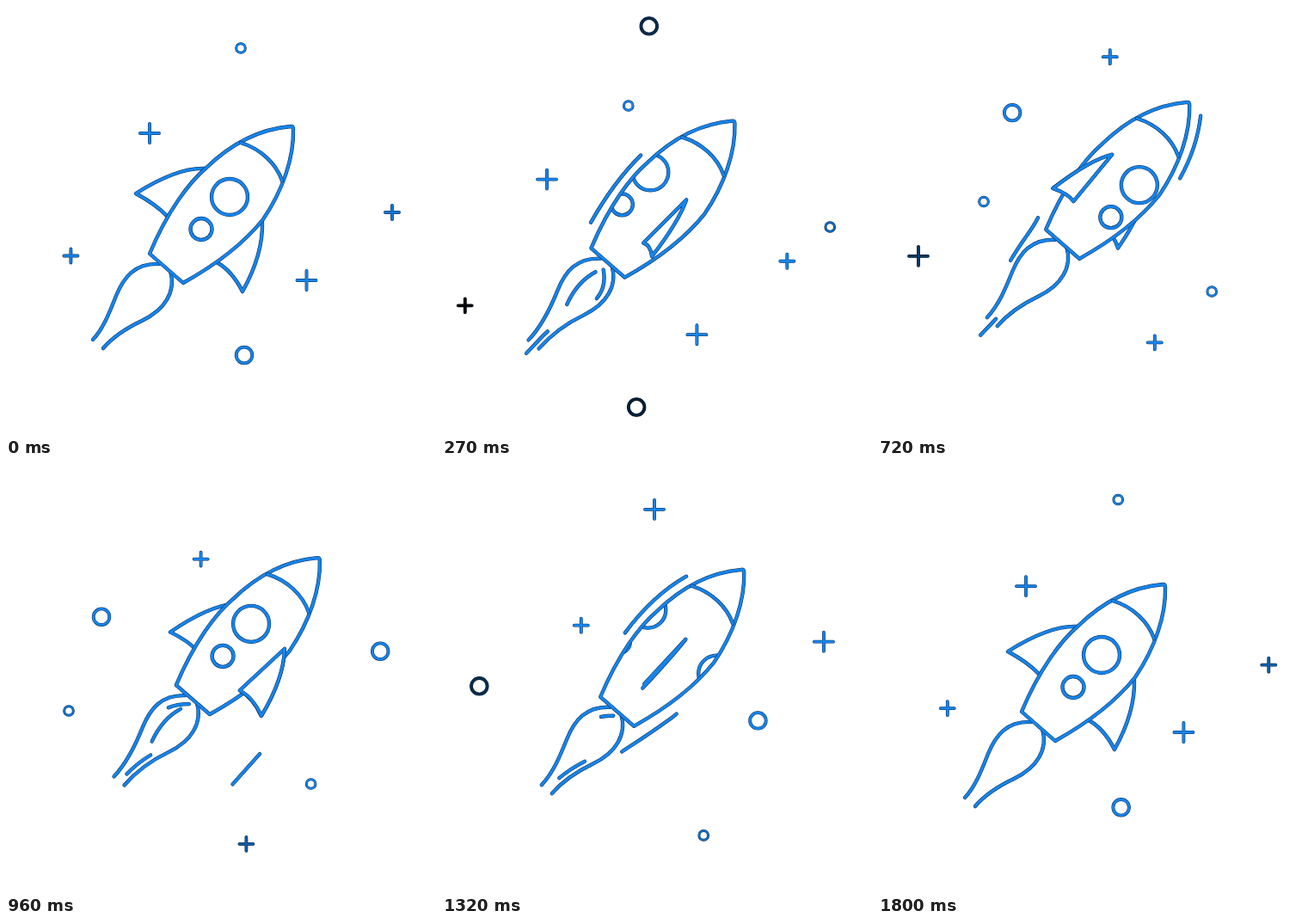
Recreate the animation shown at these times as an HTML page with a canvas. Size 500 by 500 pixels, loop 1.83 s.

```html
<!DOCTYPE html>
<html lang="en">
<head>
<meta charset="utf-8">
<title>Rocket</title>
<style>
html, body { margin: 0; width: 100%; height: 100%; overflow: hidden; background: #fff; }
canvas { display: block; width: 500px; height: 500px; }
</style>
</head>
<body>
<canvas id="stage"></canvas>
<script>
const LOOP = 1830, STEP = 30;
const CYCLE = 1800;   // one rise and fall; the loop ends with a short rest
const TURN = 895;     // half a roll about the long axis
const BLUE = [22, 132, 235], EDGE = [8, 44, 84];
const canvas = document.getElementById('stage');
const ctx = canvas.getContext('2d');
const scale = window.devicePixelRatio || 1;
canvas.width = canvas.height = 500 * scale;

// Rocket parts, in the resting position
const hull = new Path2D('M167 288C188 238 213 205 233 188C262 160 296 143 331 140Q334 140 334 143C335 176 322 214 299 248C275 278 242 302 206 322Z');
const nose = new Path2D('M273 159C296 166 314 183 321 203');
const finRight = [298, 250, 299, 277, 290, 305, 275, 332, 263, 308, 245, 298];
const finLeft = [231, 189, 207, 188, 178, 201, 151, 218, 175, 231, 188, 245];
const portholes = [{ x: 260, y: 222, r: 21 }, { x: 227, y: 259.5, r: 12.5 }];

// Speed lines: a dash runs along each route after every start time
function streak(d, size, life, starts) {
  const el = document.createElementNS('http://www.w3.org/2000/svg', 'path');
  el.setAttribute('d', d);
  return { path: new Path2D(d), length: el.getTotalLength(), size, life, starts };
}
const streaks = [
  streak('M181 312C186 336 174 350 157 359C135 369 120 380 108 393L91 411', .25, 340, [0, 200, 430, 740, 1125, 1505]),
  streak('M180 312C155 322 145 340 139 353C133 366 118 382 91 411', .38, 450, [125, 815, 1490]),
  streak('M182 310C150 310 140 325 132 347C128 358 124 370 118 380', .25, 320, [900, 1285]),
  streak('M331 128C262 134 205 184 158 274C150 290 140 300 126 324', .33, 400, [48, 380, 1152, 1495]),
  streak('M348 142C346 200 315 260 249 313C220 334 205 343 190 353', .28, 310, [640, 1080, 1368]),
  streak('M290 339L215 423', .42, 260, [820])
];

// Stars drift down-left on parallel lines: place at time 0 and pixels per step
const SLOPE = 1.19;
const smallRing = (x, y) => circle(x, y, 5.3);
const bigRing = (x, y) => circle(x, y, 9.3);
const smallPlus = (x, y) => plus(x, y, 8);
const bigPlus = (x, y) => plus(x, y, 11);
const stars = [
  { shape: smallRing, x: 273, y: 49, speed: 6.25 },
  { shape: smallRing, x: 489, y: 212, speed: 4.2 },
  { shape: bigRing, x: 277, y: 406, speed: 5.65 },
  { shape: bigRing, x: 291.5, y: -37, speed: 5.64 },
  { shape: smallPlus, x: 449, y: 240, speed: 5.3 },
  { shape: smallPlus, x: 75.4, y: 290.5, speed: 5.4 },
  { shape: bigPlus, x: 167, y: 148, speed: 5 },
  { shape: bigPlus, x: 349.5, y: 319, speed: 5.9 }
];

function circle(x, y, r) {
  const p = new Path2D();
  p.arc(x, y, r, 0, Math.PI * 2);
  return p;
}

const plus = (x, y, arm) =>
  new Path2D(`M${x - arm} ${y}h${2 * arm}M${x} ${y - arm}v${2 * arm}`);

const shade = (rgb, level) => `rgb(${rgb.map(c => Math.round(c * level))})`;

function line(path, width = 4.3, level = 1) {
  ctx.strokeStyle = shade(EDGE, level);
  ctx.lineWidth = width;
  ctx.stroke(path);
  ctx.strokeStyle = shade(BLUE, level);
  ctx.lineWidth = width - 1;
  ctx.stroke(path);
}

function solid(path) {
  ctx.fillStyle = '#fff';
  ctx.fill(path);
  line(path);
}

// Brightness follows the distance from the entry and exit edges
function drawStar(star, t) {
  const run = star.speed * t / STEP;
  const x = star.x - run, y = star.y + SLOPE * run;
  const entry = Math.min(y - 14, 474 - x) / 28;
  const exit = Math.min(x - 24, 480 - y) / 55;
  const level = Math.min(1, entry, exit);
  if (level > 0) line(star.shape(x, y), star.shape === smallRing ? 3 : 3.8, level);
}

function drawStars(t) {
  const clock = Math.min(t, CYCLE - STEP);
  for (const star of stars)
    for (const k of [-1, 0, 1]) drawStar(star, clock + k * CYCLE);
}

function drawStreak({ path, length, size, life, starts }, t) {
  for (const start of starts) {
    const head = (t - start) / life * (1 + size);
    const from = Math.max(0, head - size), to = Math.min(1, head);
    if (to <= from) continue;
    ctx.setLineDash([(to - from) * length, length * 2]);
    ctx.lineDashOffset = -from * length;
    line(path);
  }
  ctx.setLineDash([]);
}

// The tail flickers three times per cycle
function drawFlame(t) {
  const e = 4.5 - 3.5 * Math.cos(6 * Math.PI * t / CYCLE), h = e / 2;
  line(new Path2D(`M178 300C150 299 137 315 128 337C120 357 ${114 - h} ${374 + h} ${102 - e} ${387 + e}`));
  line(new Path2D(`M191 308C198 332 185 353 158 366C139 375 ${125 - h} ${384 + h} ${114 - e} ${397 + e}`));
}

// k runs from 0 (right side) to 1 (left side)
function fin(k) {
  const p = finRight.map((v, i) => v + (finLeft[i] - v) * k);
  return new Path2D(`M${p.slice(0, 2)}C${p.slice(2, 8)}Q${p.slice(8)}Z`);
}

function drawPortholes(turn) {
  ctx.save();
  ctx.clip(hull);
  for (const side of [0, 1]) {
    const shift = 107 * (side - turn);
    for (const { x, y, r } of portholes) line(circle(x + shift * .747, y + shift * .69, r));
  }
  ctx.restore();
}

function drawRocket(t) {
  const turn = Math.min(t / TURN, 2) % 1;
  const lift = 31.2 * (1 - Math.cos(2 * Math.PI * t / CYCLE)) / 2;
  ctx.save();
  ctx.translate(lift, -lift);
  drawFlame(t);
  solid(fin(1 - turn));
  solid(fin(turn));
  ctx.fillStyle = '#fff';
  ctx.fill(hull);
  drawPortholes(turn);
  line(hull);
  line(nose);
  if (turn > 0) solid(fin(turn));
  streaks.forEach(s => drawStreak(s, t));
  ctx.restore();
}

function draw(now) {
  const t = Math.floor(now % LOOP / STEP) * STEP;
  ctx.setTransform(scale, 0, 0, scale, 0, 0);
  ctx.fillStyle = '#fff';
  ctx.fillRect(0, 0, 500, 500);
  ctx.lineCap = ctx.lineJoin = 'round';
  drawStars(t);
  drawRocket(t % CYCLE);
}

const begin = performance.now();
function tick() {
  draw(performance.now() - begin);
  requestAnimationFrame(tick);
}
tick();
</script>
</body>
</html>
```
